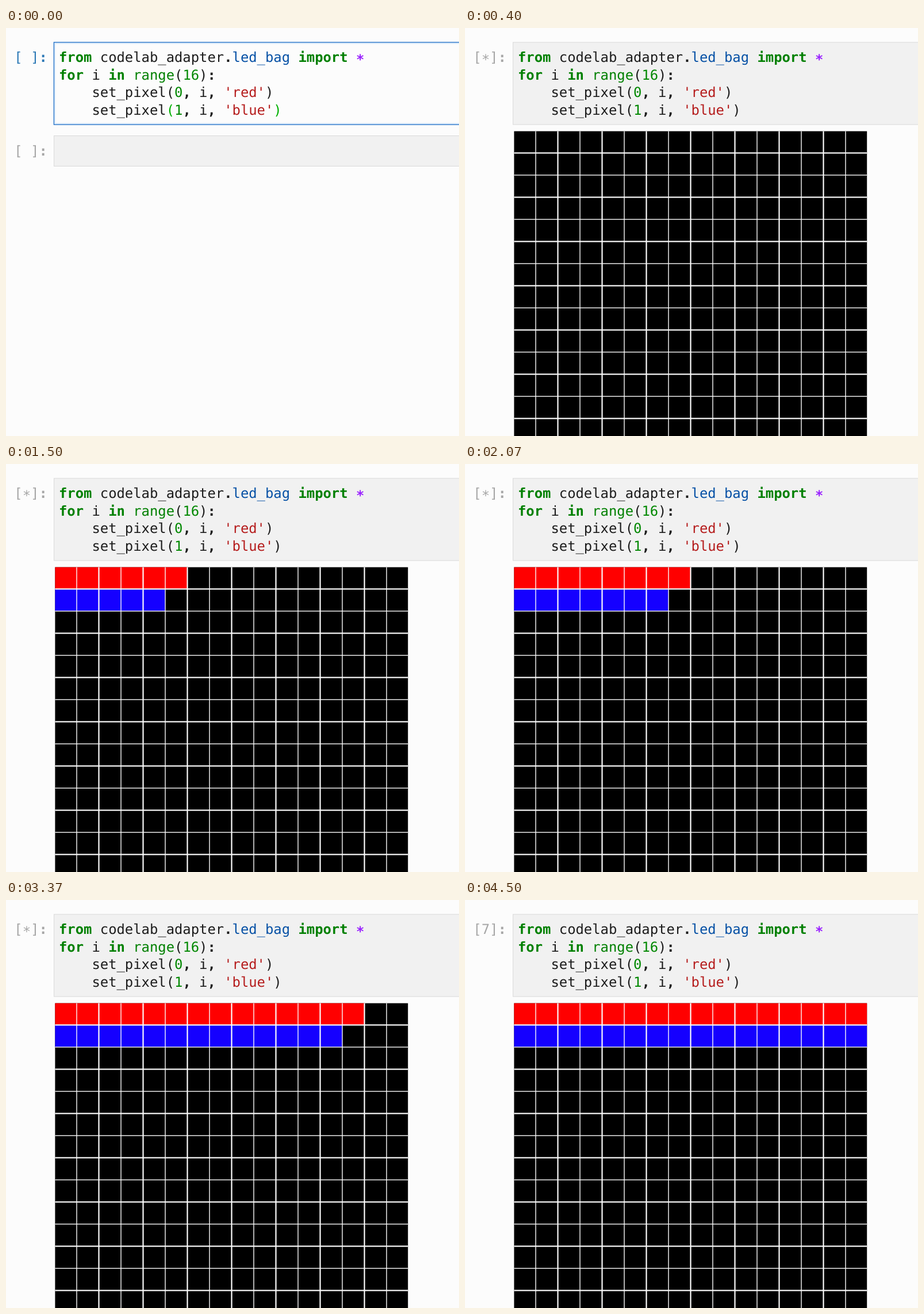
Write an HTML page that moves like this. It is 788 px wide and 710 px high and loops after 4530 ms.

```html
<!DOCTYPE html>
<html lang="en">
<head>
<meta charset="utf-8">
<title>LED notebook</title>
<style>
html, body { margin: 0; width: 100%; height: 100%; overflow: hidden; background: #fcfcfc; }
svg { display: block; width: 788px; height: 710px; }
text {
  font: 23.85px "DejaVu Sans Mono", "Liberation Mono", monospace;
  text-rendering: geometricPrecision;
  white-space: pre;
  fill: #1c1c1c;
}
.key { font-weight: bold; fill: #008000; }
.dot { font-weight: bold; }
.prop { fill: #0550a5; }
.fn { fill: #008000; }
.num { fill: #008800; }
.str { fill: #b51c1c; }
.op { font-weight: bold; fill: #9a22ff; }
.match { fill: #00b000; }
.idle { fill: #a6a6a6; }
.live { fill: #2b78b5; }
</style>
</head>
<body>
<svg id="stage" viewBox="0 0 788 710"></svg>
<script>
const LOOP = 4530, RUN_AT = 200, GRID_AT = 400, DONE_AT = 3850;
const FIRST_RED = 408, STEP = 217, BLUE_LAG = 152;
const ADV = 14.36, CODE_X = 92, PROMPT_X = 14.3, LINE = 30.6, BASE = 59;
const PITCH = 38.5, GRID_X = 84.5, GRID_Y = 179, COLS = 16;

const stage = document.getElementById("stage");

function add(tag, attrs, parent = stage) {
  const node = document.createElementNS("http://www.w3.org/2000/svg", tag);
  for (const k in attrs) node.setAttribute(k, attrs[k]);
  parent.appendChild(node);
  return node;
}

const rect = (x, y, width, height, fill, parent) =>
  add("rect", { x, y, width, height, fill }, parent);

function word(str, x, y, cls, parent) {
  const node = add("text", { x, y: str === "*" ? y + 3.5 : y, class: cls }, parent);
  node.textContent = str;
  return node;
}

const show = (node, on) => node.setAttribute("visibility", on ? "visible" : "hidden");

// Code cells
const box = add("rect", { x: 83.5, y: 25, width: 720, height: 143 });
const glow = add("rect", { x: 85.2, y: 26.7, width: 720, height: 139.6, fill: "none",
  stroke: "#dcebfa", "stroke-width": 2 });
const next = add("g", {});
add("rect", { x: 83.5, y: 187.5, width: 720, height: 53, fill: "#f1f1f1", stroke: "#d9d9d9" }, next);

// Each line is a list of [text, class] pairs
const call = (row, color) => [["    set_pixel"], ["(", "open"], [row, "num"], [",", "dot"], [" i"],
  [",", "dot"], [" "], [`'${color}'`, "str"], [")", "close"]];
const code = [
  [["from", "key"], [" codelab_adapter"], [".", "dot"], ["led_bag", "prop"], [" "],
    ["import", "key"], [" "], ["*", "op"]],
  [["for", "key"], [" i "], ["in", "key"], [" "], ["range", "fn"], ["("], ["16", "num"], [")"], [":", "dot"]],
  call("0", "red"),
  call("1", "blue")
];
const pair = [];
code.forEach((line, row) => {
  let col = 0;
  for (const [str, cls = ""] of line) {
    const lead = str.length - str.trimStart().length;
    if (str.trim()) {
      const node = word(str.trim(), CODE_X + (col + lead) * ADV, BASE + row * LINE, cls);
      if (row === 3 && (cls === "open" || cls === "close")) pair.push(node);
    }
    col += str.length;
  }
});

function prompt(y, parent) {
  const g = add("g", {}, parent);
  const part = (str, col, cls = "") => word(str, PROMPT_X + col * ADV, y, cls, g);
  part("[", 0);
  part("]", 2);
  part(":", 3, "dot");
  const marks = { "*": part("*", 1), "7": part("7", 1) };
  return (mark, cls) => {
    for (const node of g.children) {
      node.classList.remove("idle", "live");
      node.classList.add(cls);
    }
    for (const k in marks) marks[k].setAttribute("display", k === mark ? "inline" : "none");
  };
}
const setTop = prompt(BASE);
const setNext = prompt(BASE + 163, next);

// LED panel: bars below, dividing lines above
const panel = add("g", {});
rect(85.4, 179.6, 613.8, 540, "#000", panel);
const red = rect(85.4, 179.6, 0, 37.9, "#f00", panel);
const blue = rect(85.4, 217.5, 0, 38.5, "#1500ff", panel);
for (let i = 1; i < COLS; i++) {
  const wide = i % 2 ? 1.4 : 2.2;
  rect(GRID_X + i * PITCH - wide / 2, 179.6, wide, 540, "#fcfcfc", panel);
}
for (let i = 1; i < 14; i++) {
  const wide = i % 2 ? 2.2 : 1.4;
  rect(85.4, GRID_Y + i * PITCH - wide / 2, 613.8, wide, "#fcfcfc", panel);
}

function fillBar(bar, t, start) {
  const lit = Math.max(0, Math.min(COLS, Math.floor((t - start) / STEP) + 1));
  bar.setAttribute("width", lit ? Math.min(lit * PITCH - 0.9, 613.8) : 0);
}

function draw(t) {
  const editing = t < RUN_AT, output = t >= GRID_AT;
  box.setAttribute("fill", editing ? "#fcfcfc" : "#f1f1f1");
  box.setAttribute("stroke", editing ? "#2472c8" : "#d9d9d9");
  box.setAttribute("stroke-width", editing ? 1.6 : 1);
  show(glow, editing);
  pair.forEach(node => node.classList.toggle("match", editing));
  setTop(editing ? "" : t < DONE_AT ? "*" : "7", editing ? "live" : "idle");
  setNext("", editing ? "idle" : "live");
  show(next, !output);
  show(panel, output);
  fillBar(red, t, FIRST_RED);
  fillBar(blue, t, FIRST_RED + BLUE_LAG);
}

const begin = performance.now();
function tick() {
  draw((performance.now() - begin) % LOOP);
  requestAnimationFrame(tick);
}
draw(0);
requestAnimationFrame(tick);
</script>
</body>
</html>
```
